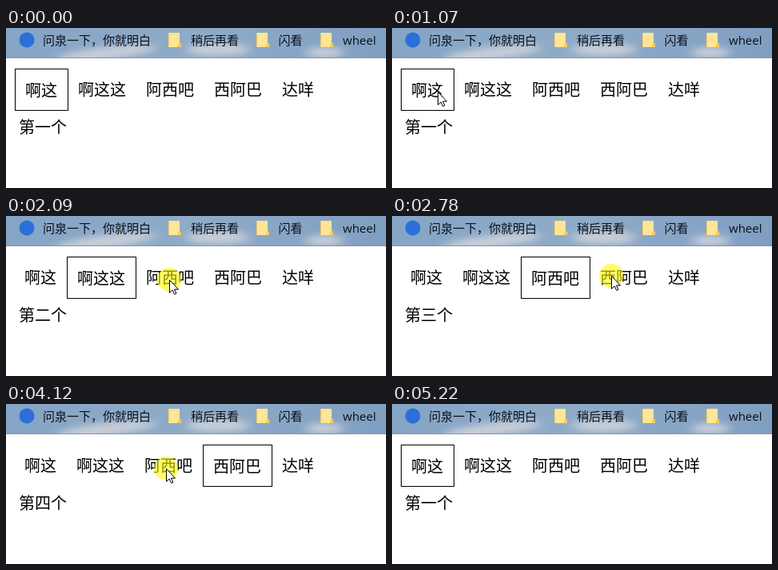
An HTML page for the animation above (5.88 s loop, 475 by 201 pixels).

```html
<!DOCTYPE html>
<html lang="zh-CN">
<head>
<meta charset="utf-8">
<title>Tabs</title>
<style>
  html, body { margin: 0; width: 100%; height: 100%; overflow: hidden; background: #fff; }
  svg { display: block; width: 475px; height: 201px; }
  text { font-family: "Noto Sans CJK SC", "Noto Sans CJK", sans-serif; font-size: 20px; font-weight: 300; fill: #000; }
  #bar text { font-size: 15px; font-weight: 400; fill: #0c1016; }
  #bar .latin { font-family: "Open Sans", sans-serif; }
</style>
</head>
<body>
<svg viewBox="0 0 475 201" lang="zh-CN">
  <defs>
    <linearGradient id="sky">
      <stop offset="0" stop-color="#85a5c6"/>
      <stop offset=".5" stop-color="#8fabc7"/>
      <stop offset="1" stop-color="#7f9fc2"/>
    </linearGradient>
    <filter id="soft" x="-30%" y="-80%" width="160%" height="260%"><feGaussianBlur stdDeviation="7 4"/></filter>
    <clipPath id="strip"><rect width="475" height="38"/></clipPath>
    <g id="folder">
      <path d="M0 0h14v12l2 2v4H0z" fill="#f2cd69"/>
      <path d="M1 0h13v12l-2 2v4H1z" fill="#ffe594"/>
    </g>
  </defs>
  <rect width="475" height="201" fill="#fff"/>
  <g id="bar" clip-path="url(#strip)">
    <rect width="475" height="38" fill="url(#sky)"/>
    <g filter="url(#soft)" fill="#c8ced8">
      <ellipse cx="125" cy="32" rx="62" ry="8" transform="rotate(-7 125 32)"/>
      <ellipse cx="265" cy="27" rx="40" ry="8"/>
      <ellipse cx="398" cy="31" rx="24" ry="7"/>
    </g>
    <rect y="37" width="475" height="1" fill="#8492a4"/>
    <circle cx="26" cy="15" r="9.5" fill="#2c6fd8"/>
    <text x="46" y="21">问泉一下，你就明白</text>
    <use href="#folder" x="203" y="6"/>
    <text x="231" y="21">稍后再看</text>
    <use href="#folder" x="313" y="6"/>
    <text x="340.500" y="21">闪看</text>
    <use href="#folder" x="393" y="6"/>
    <text class="latin" x="421" y="21">wheel</text>
  </g>
  <g id="tabs"></g>
  <rect id="frame" y="51.500" height="52" fill="none" stroke="#000"/>
  <text id="panel" x="16" y="131.500"></text>
  <g id="pointer">
    <circle id="halo" r="15" fill="#fffa00" opacity=".58"/>
    <path d="M.5.5v16l3.700-3.500 2.400 5.400 2.300-1-2.400-5.200h5z" fill="#fff" stroke="#000"/>
  </g>
</svg>
<script>
const LOOP = 5880, ENTER = 260, EXIT = 5220;
const TICK = 70, HOLD = 130, REST = 210, MS_PER_PX = 3.3;
const LEFT = 11, PAD = 12.5, EM = 20;
const labels = ['啊这', '啊这这', '阿西吧', '西阿巴', '达咩'];
const ordinals = '一二三四五';

const stop = (press, x, y, tab) => ({ press, x, y, tab });
const stops = [
  stop(940, 57, 80, 0), stop(1470, 107, 80, 1), stop(2090, 204, 80, 2),
  stop(2710, 274, 75, 3), stop(3290, 366, 84, 4), stop(3720, 281, 84, 3),
  stop(4060, 200, 81, 2), stop(4400, 118, 81, 1), stop(4740, 50, 81, 0),
  stop(5150, 384, 178)
];

const $ = id => document.getElementById(id);
const tabs = labels.map(label => {
  const el = document.createElementNS('http://www.w3.org/2000/svg', 'text');
  el.textContent = label;
  $('tabs').append(el);
  return el;
});

// Travel at a steady speed, hurrying when the next press is near.
function stateAt(t) {
  let x = 167, y = 180, active = 0, down = false, leave = ENTER;
  for (const s of stops) {
    if (t < leave) break;
    const dx = s.x - x, dy = s.y - y;
    const travel = Math.min(s.press - leave, Math.hypot(dx, dy) * MS_PER_PX);
    const elapsed = t - leave;
    const p = elapsed >= travel ? 1 : Math.floor(elapsed / TICK) * TICK / travel;
    x += dx * p;
    y += dy * p;
    if (s.tab !== undefined) {
      down = t >= s.press && t < s.press + HOLD;
      if (t >= s.press + HOLD) active = s.tab;
    }
    leave = s.press + REST;
  }
  return { x: Math.round(x), y: Math.round(y), active, down };
}

function showTab(active) {
  let x = LEFT;
  tabs.forEach((el, i) => {
    const border = i === active ? 1 : 0;
    const width = labels[i].length * EM + 2 * (PAD + border);
    el.setAttribute('x', Math.floor(x + PAD) + border);
    el.setAttribute('y', 84.5 + border);
    if (border) {
      $('frame').setAttribute('x', x + .5);
      $('frame').setAttribute('width', width - 1);
    }
    x += width;
  });
  $('panel').textContent = `第${ordinals[active]}个`;
}

let shown = -1;
function draw() {
  const t = performance.now() % LOOP;
  const { x, y, active, down } = stateAt(t);
  if (active !== shown) showTab(shown = active);
  $('pointer').setAttribute('transform', `translate(${x} ${y})`);
  $('pointer').style.display = t >= ENTER && t < EXIT ? '' : 'none';
  $('halo').style.display = down ? '' : 'none';
  requestAnimationFrame(draw);
}
draw();
</script>
</body>
</html>
```
